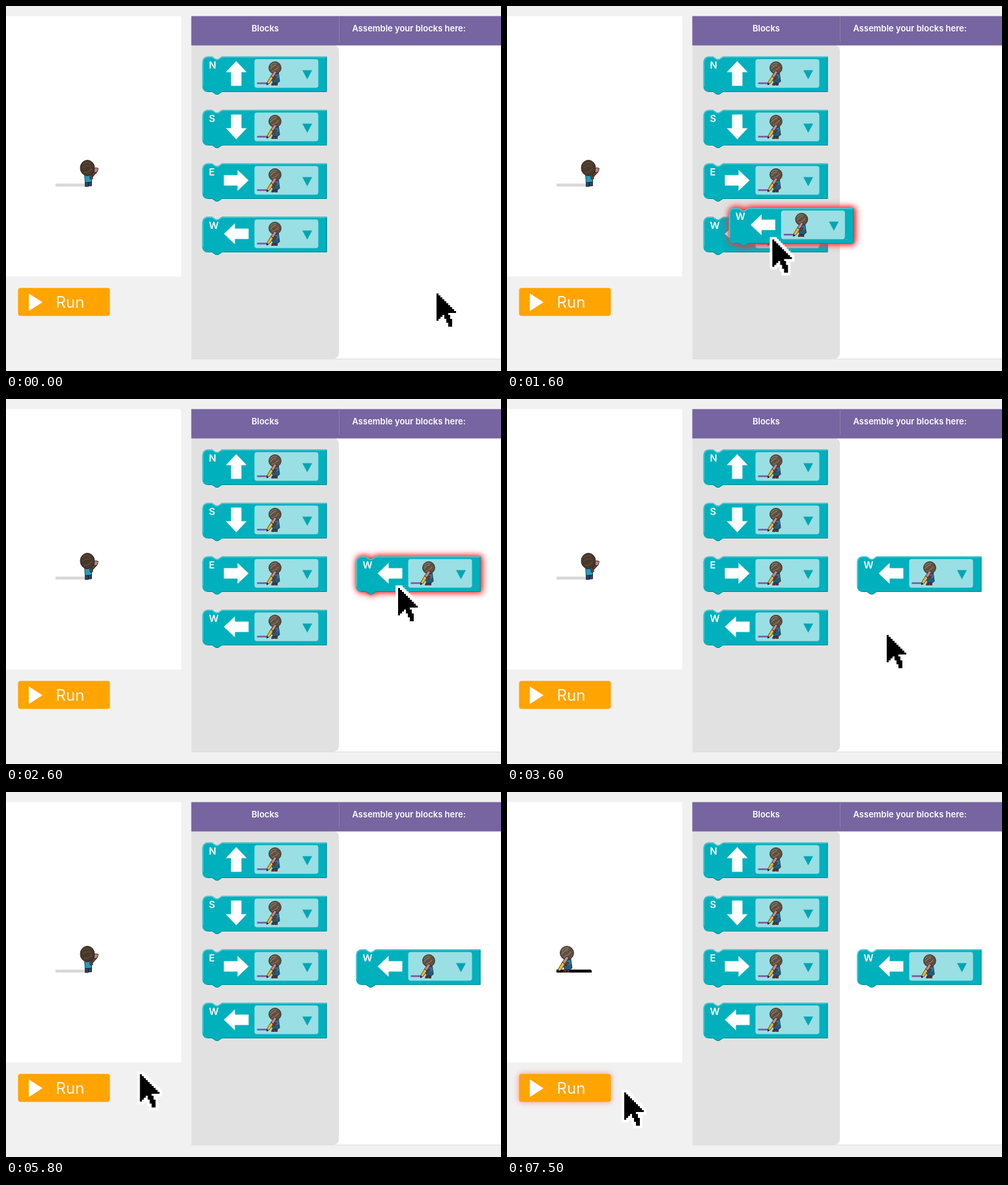
An HTML page for the animation above (8 s loop, 760x560 px).

```html
<!DOCTYPE html>
<html lang="en">
<head>
<meta charset="utf-8">
<style>
  html, body { margin: 0; width: 100%; height: 100%; overflow: hidden; background: #f1f1f1; }
  svg { display: block; width: 760px; height: 560px; }
  text { font-family: Inter, "Open Sans", sans-serif; font-weight: 600; fill: #fff; }
</style>
</head>
<body>
<svg viewBox="0 0 760 560">
  <defs>
    <g id="drawing" stroke="#211a17" stroke-width=".8">
      <path d="M12 20L21 20L23 34L19 37L12 37L9 30Z" fill="#24597f"/>
      <path d="M14 22L20 21L22 28L15 30Z" fill="#2b7796" stroke="none"/>
      <path d="M10 37h4v3.500h-5zM15 37h4v3.500h-4z" fill="#762d35"/>
      <ellipse cx="15" cy="11" rx="10.500" ry="10.500" fill="#5f4f40"/>
      <path d="M7 8q5-7 11-4M7 13q4-6 10-7M10 17q7-2 11-8" fill="none" stroke="#857260" stroke-width="1.800"/>
      <path d="M1 40L2 35L8 25L12 28L6 37Z" fill="#f4b62c"/>
      <path d="M8 25L14 16L18 18L12 28Z" fill="#c9868a"/>
      <path d="M1 40l.6-3 2 1.500z" fill="#211a17"/>
      <path d="M11 28l4-3 3 1-4 5z" fill="#6a4030" stroke-width=".6"/>
    </g>
    <g id="standing" stroke="#211a17" stroke-width=".8">
      <path d="M16 22L22 17L26 19L18 28Z" fill="#60402f"/>
      <path d="M20 15l4-3 4 1-1 5-4 2z" fill="#b98580"/>
      <path d="M8 34h5v7H8zM13 34h5v6h-5z" fill="#24456f"/>
      <path d="M7 21L18 21L18 34L8 35Z" fill="#239bc0"/>
      <path d="M15 25l4-1 1 5-4 1z" fill="#69442f" stroke-width=".6"/>
      <ellipse cx="11.500" cy="12.500" rx="11" ry="12" fill="#493829"/>
      <path d="M4 8q6-7 12-2M4 13q6-6 13-3M6 19q7 2 12-6" fill="none" stroke="#5d4a39" stroke-width="1.500"/>
    </g>
    <path id="arrow" d="M0-19L16-2H8V19H-8V-2H-16Z" fill="#fff"/>
  </defs>

  <path d="M0 15.500H269V415H0z" fill="#fff"/>
  <path d="M284.500 60H760V541H284.500z" fill="#fff"/>
  <path d="M284.500 541.500H760" stroke="#dedede"/>
  <path d="M284.500 60H503a8 8 0 0 1 8 8V533a8 8 0 0 1-8 8H284.500z" fill="#e1e1e1"/>
  <path d="M284.500 15.500H760V60.500H284.500z" fill="#7665a0"/>
  <path d="M511.500 15.500V55" stroke="#8d80ae"/>
  <text x="398" y="39" font-size="13">Blocks</text>
  <text x="531.500" y="39" font-size="13">Assemble your blocks here:</text>

  <path id="line" d="M76 272.500H128a2 2 0 0 1 2 2V277H76z"/>
  <use id="idle" href="#standing" x="113.500" y="236"/>
  <use id="artist" href="#drawing"/>

  <rect id="run" x="18.500" y="432.500" width="141" height="43" rx="4" fill="#ffa400"/>
  <path d="M35 441L56 454.500L35 468z" fill="#fff"/>
  <text x="76.500" y="463" font-size="24" style="font-weight:400;fill:#fff6e6">Run</text>

  <g id="blocks"></g>
  <path id="cursor" fill="#000" stroke="#fff" stroke-width="2.600" paint-order="stroke"/>
</svg>
<script>
const $ = id => document.getElementById(id);
const outline = 'M0 8A8 8 0 0 1 8 0H15l6 4h3l6-4H191V54.500H30l-6 4h-3l-6-4H8A8 8 0 0 1 0 46.500Z';

const block = (letter, angle, y, id = '') => `
  <g id="${id}" transform="translate(301.5 ${y})">
    <path d="${outline}" fill="#00b0bd"/>
    <path d="M.8 46V8A7.200 7.200 0 0 1 8 .8H15l6 4h3l6-4H190" fill="none" stroke="#4dc8d0" stroke-width="1.600"/>
    <path d="M190.500 1V54H30l-6 4h-3l-6-4H8" fill="none" stroke="#008790"/>
    <text x="10" y="18.500" font-size="14.800">${letter}</text>
    <use href="#arrow" transform="translate(52 26) rotate(${angle})"/>
    <rect x="80" y="4" width="98" height="44" rx="4" fill="#99dfe4"/>
    <path d="M84 41H100.500" stroke="#7656a5" stroke-width="2.500"/>
    <use href="#drawing" transform="translate(98 7.500) scale(.9)"/>
    <path d="M153.500 21H168.500L161 35z" fill="#00a6b3"/>
  </g>`;

$('blocks').innerHTML = block('N', 0, 77.5) + block('S', 180, 159.5) + block('E', 90, 241.5)
  + block('W', -90, 323.5) + block('W', -90, 323.5, 'dragged');
document.querySelector('text').setAttribute('text-anchor', 'middle');
$('cursor').setAttribute('d', 'M0 0' + 'h1v1'.repeat(10)
  + 'H6V11H7V13H8V17H6V15H5V13H4V11H3V12H2V13H1V14H0Z');

// Each key is [time, ...values]; values run linearly between keys.
const cursorKeys = [[200, 661, 441], [1400, 368.5, 372], [2600, 602, 290], [3600, 583, 362],
  [6200, 137, 446], [7000, 171, 459], [7500, 180, 461]];
const blockKeys = [[1400, 301.5, 323.5], [2600, 537.5, 241.5]];
const blockGlow = [[1200, 0], [1600, 1], [2600, 0.9], [3000, 0]];
const runGlow = [[5800, 0], [6200, 1], [6600, 0.95], [7500, 0.25]];
const artistKeys = [[6600, 114], [7000, 77]];
const lineKeys = [[6200, 216], [7000, 0]];

function at(keys, t) {
  const next = keys.findIndex(k => k[0] > t);
  if (next === 0) return keys[0].slice(1);
  if (next < 0) return keys[keys.length - 1].slice(1);
  const a = keys[next - 1], b = keys[next];
  const p = (t - a[0]) / (b[0] - a[0]);
  return a.slice(1).map((v, i) => v + (b[i + 1] - v) * p);
}

function glow(el, alpha, dx) {
  const shadow = `drop-shadow(${dx}px 0 4px rgba(255,50,55,${alpha}))`;
  el.style.filter = alpha > 0 ? `${shadow} ${shadow}` : 'none';
}

function draw(now) {
  const time = now % 8000;
  const t = time >= 7500 ? 7500 : Math.min(7000, Math.floor(time / 200) * 200);
  $('cursor').setAttribute('transform', `translate(${at(cursorKeys, t)}) scale(3)`);
  $('dragged').setAttribute('transform', `translate(${at(blockKeys, t)})`);
  glow($('dragged'), at(blockGlow, t)[0], 1);
  glow($('run'), at(runGlow, t)[0], 0);

  const running = t >= 6400;
  $('idle').style.display = running ? 'none' : '';
  $('artist').style.display = running ? '' : 'none';
  $('artist').setAttribute('transform', `translate(${at(artistKeys, t)} 236)`);
  const shade = at(lineKeys, t)[0];
  $('line').setAttribute('fill', `rgb(${shade},${shade},${shade})`);
  requestAnimationFrame(() => draw(performance.now() - start));
}

const start = performance.now();
draw(0);
</script>
</body>
</html>
```
